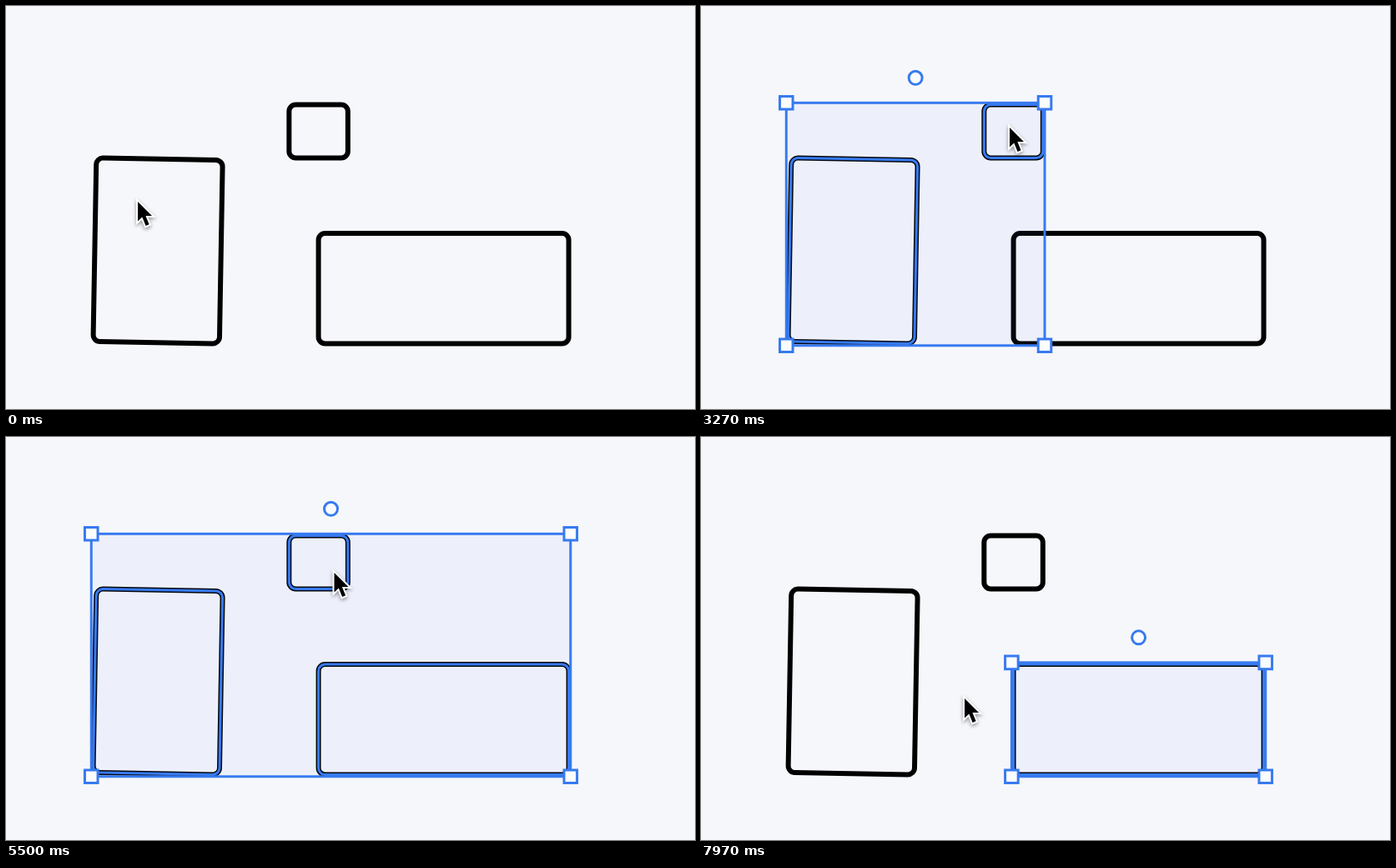
An HTML page with a canvas that plays this animation: 826 by 484 pixels, repeating every 8 s.

```html
<!DOCTYPE html>
<html lang="en">
<head>
<meta charset="utf-8">
<title>Multi-selection</title>
<style>
  html, body { margin: 0; width: 100%; height: 100%; overflow: hidden; background: #f6f7fb; }
  canvas { display: block; width: 826px; height: 484px; }
</style>
</head>
<body>
<canvas width="826" height="484"></canvas>
<script>
const ctx = document.querySelector('canvas').getContext('2d');
const LOOP = 8000;
const BLUE = '#377af0';
const FRAME_GAP = 2.2; // from the middle of a shape's stroke to its selection frame

// Centre, stroke size and tilt
const shapes = {
  tall: { x: 182.1, y: 294, w: 151.4, h: 220.5, angle: Math.PI / 180 },
  small: { x: 374.6, y: 150.5, w: 70.5, h: 64, angle: 0 },
  wide: { x: 524.6, y: 339.3, w: 300, h: 132.5, angle: 0 },
};

const selections = [
  { from: 0, names: [] },
  { from: 1100, names: ['tall'] },
  { from: 2900, names: ['tall', 'small'] },
  { from: 3950, names: ['tall', 'small', 'wide'] },
  { from: 6050, names: ['tall', 'wide'] },
  { from: 7580, names: ['wide'] },
];

// Pointer stops: time, x, y
const stops = [
  [0, 158, 235], [700, 173, 248], [1600, 173, 248], [2150, 240, 214],
  [2470, 303.5, 173], [2800, 370, 146], [3300, 370, 146], [3850, 432, 318],
  [4250, 432, 318], [4630, 340.5, 263], [5100, 380, 175], [5500, 393.5, 163],
  [6400, 390, 160], [7070, 312, 209], [7400, 212, 256], [7640, 212, 256],
  [7970, 316, 314], [8000, 322, 316],
];

function pointerAt(time) {
  const next = Math.max(1, stops.findIndex(stop => stop[0] > time));
  const [t0, x0, y0] = stops[next - 1];
  const [t1, x1, y1] = stops[next];
  const u = (time - t0) / (t1 - t0);
  const eased = u * u * (3 - 2 * u);
  return [x0 + (x1 - x0) * eased, y0 + (y1 - y0) * eased];
}

function placed({ x, y, angle }, draw) {
  ctx.save();
  ctx.translate(x, y);
  ctx.rotate(angle);
  draw();
  ctx.restore();
}

function outline(shape, color, width) {
  placed(shape, () => {
    ctx.beginPath();
    ctx.roundRect(-shape.w / 2, -shape.h / 2, shape.w, shape.h, 8);
    ctx.strokeStyle = color;
    ctx.lineWidth = width;
    ctx.stroke();
  });
}

const framed = shape => ({ ...shape, w: shape.w + 2 * FRAME_GAP, h: shape.h + 2 * FRAME_GAP });

function frameAround(names) {
  const frames = names.map(name => framed(shapes[name]));
  if (frames.length === 1) return frames[0];
  let left = Infinity, top = Infinity, right = -Infinity, bottom = -Infinity;
  for (const { x, y, w, h, angle } of frames) {
    const cos = Math.cos(angle), sin = Math.sin(angle);
    const halfW = (w * cos + h * sin) / 2;
    const halfH = (h * cos + w * sin) / 2;
    left = Math.min(left, x - halfW);
    right = Math.max(right, x + halfW);
    top = Math.min(top, y - halfH);
    bottom = Math.max(bottom, y + halfH);
  }
  return { x: (left + right) / 2, y: (top + bottom) / 2, w: right - left, h: bottom - top, angle: 0 };
}

function drawSelection(names) {
  const frame = frameAround(names);
  const { w, h } = frame;
  placed(frame, () => {
    ctx.fillStyle = 'rgba(55, 122, 240, 0.05)';
    ctx.fillRect(-w / 2, -h / 2, w, h);
  });
  for (const name of names) outline(shapes[name], BLUE, 3);
  placed(frame, () => {
    ctx.strokeStyle = BLUE;
    ctx.lineWidth = 3;
    ctx.strokeRect(-w / 2, -h / 2, w, h);
    ctx.fillStyle = '#fbfcfe';
    ctx.beginPath();
    for (const sx of [-1, 1]) {
      for (const sy of [-1, 1]) ctx.rect(sx * w / 2 - 7.8, sy * h / 2 - 7.8, 15.6, 15.6);
    }
    ctx.fill();
    ctx.stroke();
    ctx.beginPath();
    ctx.arc(0, -h / 2 - 30, 8, 0, 2 * Math.PI);
    ctx.fill();
    ctx.stroke();
  });
}

const arrow = new Path2D('M0 0V23.5L5.3 18.6L9.6 29L13.6 27.3L9.4 17H17Z');

function drawPointer(x, y) {
  ctx.save();
  ctx.translate(x, y);
  ctx.lineWidth = 4;
  ctx.strokeStyle = '#fff';
  ctx.shadowColor = 'rgba(0, 0, 0, 0.4)';
  ctx.shadowBlur = 4;
  ctx.shadowOffsetY = 2;
  ctx.stroke(arrow);
  ctx.shadowColor = 'transparent';
  ctx.fillStyle = '#000';
  ctx.fill(arrow);
  ctx.restore();
}

function render() {
  const time = performance.now() % LOOP;
  ctx.fillStyle = '#f6f7fb';
  ctx.fillRect(0, 0, 826, 484);
  for (const shape of Object.values(shapes)) outline(shape, '#000', 6);
  const { names } = selections.findLast(step => step.from <= time);
  if (names.length) drawSelection(names);
  drawPointer(...pointerAt(time));
  requestAnimationFrame(render);
}

render();
</script>
</body>
</html>
```
